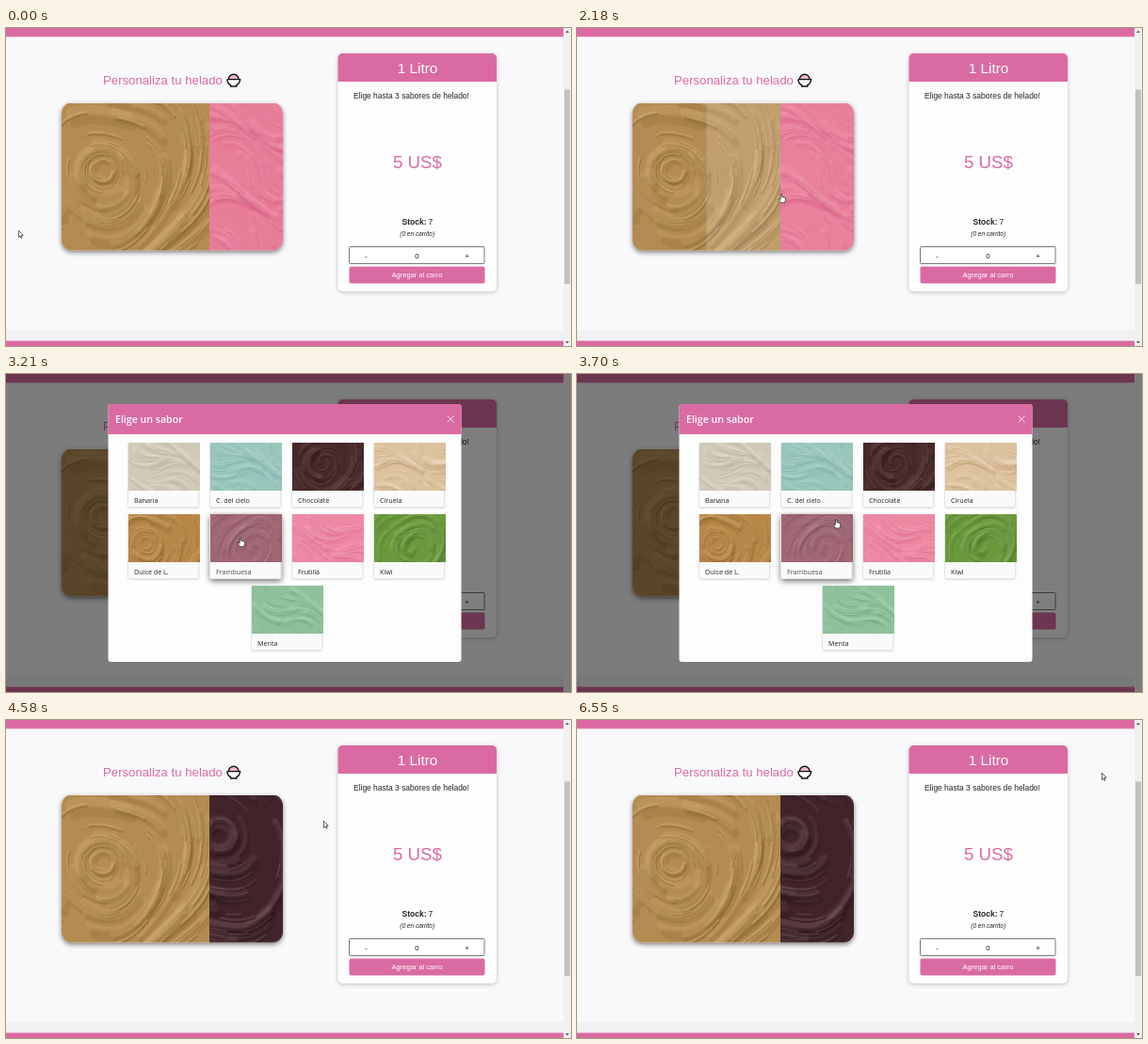
Recreate the animation shown at these times as an HTML page with a canvas. Size 600 by 338 pixels, loop 6.58 s.

```html
<!DOCTYPE html>
<html lang="es">
<head>
<meta charset="utf-8">
<title>Personaliza tu helado</title>
<style>
html, body { margin: 0; width: 100%; height: 100%; overflow: hidden; background: #f9f9fb; }
canvas { display: block; }
</style>
</head>
<body>
<canvas id="stage" width="600" height="338"></canvas>
<script>
const LOOP = 6580, OPEN = 2820, CLOSE = 4340;
const PINK = '#da6ba2';
const SANS = '"Liberation Sans", Arial, sans-serif';
const UI = '"Open Sans", "Noto Sans", sans-serif';
const stage = document.getElementById('stage').getContext('2d');

const clamp = v => Math.max(0, Math.min(1, v));
const ramp = (t, a, b) => clamp((t - a) / (b - a));
const smooth = u => u * u * (3 - 2 * u);

function layer(w, h) {
  const c = document.createElement('canvas');
  c.width = w;
  c.height = h;
  return c.getContext('2d');
}

function random(seed) {
  return () => {
    seed = (seed * 1664525 + 1013904223) % 4294967296;
    return seed / 4294967296;
  };
}

function box(g, x, y, w, h, r, fill, stroke) {
  g.beginPath();
  g.roundRect(x, y, w, h, r);
  if (fill) { g.fillStyle = fill; g.fill(); }
  if (stroke) { g.strokeStyle = stroke; g.lineWidth = 1; g.stroke(); }
}

function text(g, s, x, y, font, color, align = 'left') {
  g.font = font;
  g.fillStyle = color;
  g.textAlign = align;
  g.fillText(s, x, y);
}

function shadow(g, color, blur, dy) {
  g.shadowColor = color;
  g.shadowBlur = blur;
  g.shadowOffsetY = dy;
}

// Spread cream: ridges that follow a swirl or a slanted, wavy direction.
function cream(w, h, [base, light, dark], seed, flow, scale = 1) {
  const g = layer(w, h), rnd = random(seed);
  g.fillStyle = base;
  g.fillRect(0, 0, w, h);
  g.lineCap = g.lineJoin = 'round';
  const angle = (x, y) => flow.length
    ? Math.atan2(y - flow[1] * h, x - flow[0] * w) + 1.57 + 0.25 * Math.sin(x / 9 / scale)
    : flow + 0.55 * Math.sin(x / 13 / scale + seed) + 0.4 * Math.cos(y / 9 / scale);
  const ridge = (steps, width, alpha) => {
    let x = rnd() * w * 1.2 - w * 0.1, y = rnd() * h * 1.2 - h * 0.1;
    const pts = [];
    for (let i = 0; i < steps; i++) {
      pts.push([x, y]);
      const a = angle(x, y);
      x += Math.cos(a) * 2.2 * scale;
      y += Math.sin(a) * 2.2 * scale;
    }
    [[dark, width * 0.55], [light, -width * 0.35]].forEach(([color, d]) => {
      g.strokeStyle = color;
      g.globalAlpha = alpha;
      g.lineWidth = width;
      g.beginPath();
      pts.forEach(p => g.lineTo(p[0] + d * 0.5, p[1] + d));
      g.stroke();
    });
  };
  const n = Math.round(w * h / 90 / scale / scale);
  for (let i = 0; i < n * 0.6; i++) ridge(12 + rnd() * 10, (2.5 + rnd() * 3) * scale, 0.2);
  for (let i = 0; i < n; i++) ridge(4 + rnd() * 9, (0.4 + rnd() * 0.8) * scale, 0.45);
  return g.canvas;
}

const CARAMEL = cream(157, 157, ['#b48c52', '#d5b37b', '#7f5928'], 11, [0.28, 0.45], 2);
const ROSE = cream(79, 157, ['#e87d9a', '#f5a6b9', '#cd5074'], 5, 0.45, 1.3);
const COCOA = cream(79, 157, ['#412429', '#83636c', '#1f0d12'], 8, [0.15, 0.3], 1.7);

const FLAVORS = [
  ['Banana', ['#cfcab8', '#efece0', '#a59f86'], 0.5],
  ['C. del cielo', ['#98c5bc', '#c2dfd9', '#6da59b'], 0.55],
  ['Chocolate', ['#48292a', '#80605f', '#231110'], [0.45, 0.4]],
  ['Ciruela', ['#dcc29d', '#f4e7d2', '#b59262'], 0.4],
  ['Dulce de L.', ['#b78747', '#dab57b', '#7b5120'], [0.25, 0.6]],
  ['Frambuesa', ['#8a4151', '#b37281', '#562232'], [0.6, 0.75]],
  ['Frutilla', ['#ee88a3', '#fab5c6', '#d35a7f'], 0.45],
  ['Kiwi', ['#6a993d', '#9dc26b', '#3d6522'], [0.55, 0.7]],
  ['Menta', ['#8dc19b', '#bbdec2', '#629e75'], 0.7]
].map(([name, tones, flow], i) => ({
  name,
  pic: cream(76, 51, tones, 21 + i * 7, flow),
  x: i === 8 ? 260 : 129 + (i % 4) * 87,
  y: 73 + Math.floor(i / 4) * 76
}));

const PARTS = [59, 137.5, 215.5];

// start, end, from x/y, to x/y, vertical bow
const MOVES = [
  [760, 2610, 13, 215, 249, 174, -7],
  [3480, 4100, 249, 174, 339, 107, 0],
  [4800, 6150, 337, 107, 557, 56, 0]
];

function pointer(t) {
  let m = MOVES[0];
  for (const next of MOVES) if (t >= next[0] - 460) m = next;
  const s = smooth(ramp(t, m[0], m[1]));
  return [m[2] + (m[4] - m[2]) * s, m[3] + (m[5] - m[3]) * s + m[6] * 4 * s * (1 - s)];
}

const isOpen = t => t >= OPEN && t < CLOSE;

function hit(t, modal, x, y, w, h) {
  const [px, py] = pointer(t);
  return isOpen(t) === modal && px >= x && px < x + w && py >= y && py < y + h;
}

// Hover strength, averaged over the last moments so that it fades.
function hover(t, ...area) {
  let sum = 0;
  for (let k = 0; k < 8; k++) sum += hit(t - k * 20, ...area);
  return sum / 8;
}

function bowl(g) {
  g.strokeStyle = '#111';
  g.lineWidth = 1.4;
  g.fillStyle = '#f2b5cb';
  g.beginPath();
  g.arc(241.7, 54.5, 5.3, Math.PI, 0);
  g.fill();
  g.stroke();
  g.fillStyle = '#fff';
  g.beginPath();
  g.moveTo(234.8, 54.6);
  g.lineTo(248.6, 54.6);
  g.quadraticCurveTo(248, 59.5, 244.8, 60.5);
  g.lineTo(244.8, 62);
  g.lineTo(238.6, 62);
  g.lineTo(238.6, 60.5);
  g.quadraticCurveTo(235.4, 59.5, 234.8, 54.6);
  g.fill();
  g.stroke();
}

function picture(g, t) {
  g.save();
  shadow(g, 'rgba(0,0,0,.5)', 5, 2);
  box(g, 59, 79.5, 235, 157, 11, '#fff');
  g.restore();
  g.save();
  g.beginPath();
  g.roundRect(59, 79.5, 235, 157, 11);
  g.clip();
  g.drawImage(CARAMEL, 59, 79.5);
  g.drawImage(t < CLOSE ? ROSE : COCOA, 215.5, 79.5);
  PARTS.forEach(x => {
    g.fillStyle = `rgba(255,255,255,${0.18 * hover(t, false, x, 79.5, 78.4, 157)})`;
    g.fillRect(x, 79.5, 78.4, 157);
  });
  g.restore();
}

function card(g) {
  g.save();
  shadow(g, 'rgba(0,0,0,.25)', 4, 1);
  box(g, 352.5, 27, 168.5, 253, 5, '#fefefe');
  g.restore();
  box(g, 352.5, 27, 168.5, 30, [5, 5, 0, 0], PINK);
  text(g, '1 Litro', 437, 48, `15.3px ${SANS}`, '#fff', 'center');
  text(g, 'Elige hasta 3 sabores de helado!', 369, 75, `8.45px ${SANS}`, '#222');
  text(g, '5 US$', 437, 148.5, `18.7px ${SANS}`, PINK, 'center');
  text(g, 'Stock:', 420.5, 209, `bold 8.5px ${SANS}`, '#222');
  text(g, '7', 448.5, 209, `8.5px ${SANS}`, '#222');
  text(g, '(0 en carrito)', 436.7, 221, `italic 6.5px ${SANS}`, '#222', 'center');
  box(g, 364.5, 232.5, 143.5, 18, 1, '#fff', '#777');
  [['-', 382.5], ['0', 436.3], ['+', 489.7]].forEach(([s, x]) =>
    text(g, s, x, 244.5, `7.5px ${SANS}`, '#111', 'center'));
  box(g, 364.5, 253.5, 144, 18, 2, PINK);
  text(g, 'Agregar al carro', 436.5, 265, `7.5px ${SANS}`, '#fff', 'center');
}

function triangle(g, y, dir) {
  g.beginPath();
  g.moveTo(594, y);
  g.lineTo(598, y);
  g.lineTo(596, y + dir * 2.2);
  g.fill();
}

function page(g, t, scrollbar) {
  g.fillStyle = '#f9f9fb';
  g.fillRect(0, 0, 600, 338);
  g.fillStyle = '#f1f1f3';
  g.fillRect(0, 321, 592, 12);
  g.fillStyle = PINK;
  g.fillRect(0, 0, 592, 9.3);
  g.fillRect(0, 332.5, 592, 6);
  if (scrollbar) {
    g.fillStyle = '#f1f1f1';
    g.fillRect(592, 0, 8, 338);
    g.fillStyle = '#c1c1c1';
    g.fillRect(593, 65.5, 6, 206.5);
    g.fillStyle = '#555';
    triangle(g, 5, -1);
    triangle(g, 333, 1);
  }
  text(g, 'Personaliza tu helado', 103, 60, `13.2px ${SANS}`, PINK);
  bowl(g);
  picture(g, t);
  card(g);
}

const sheet = layer(600, 338);

function modal(t) {
  const g = sheet;
  g.clearRect(0, 0, 600, 338);
  box(g, 108.5, 32, 375, 274, 3, '#fdfdfd');
  box(g, 108.5, 32, 375, 32, [3, 3, 0, 0], PINK);
  text(g, 'Elige un sabor', 116, 52, `600 10.6px ${UI}`, '#fff');
  g.strokeStyle = 'rgba(255,255,255,.8)';
  g.lineWidth = 1;
  g.beginPath();
  g.moveTo(468.7, 44.5);
  g.lineTo(475.7, 51.5);
  g.moveTo(475.7, 44.5);
  g.lineTo(468.7, 51.5);
  g.stroke();
  FLAVORS.forEach(({ name, pic, x, y }) => {
    const on = hover(t, true, x, y, 76, 69);
    g.save();
    shadow(g, `rgba(0,0,0,${0.12 + 0.45 * on})`, 2 + 4 * on, 1 + on);
    box(g, x + 0.5, y, 76, 69, 2, '#fafafa');
    g.restore();
    box(g, x + 0.5, y + 0.5, 75, 68, 2, '#fafafa', '#e4e4e4');
    g.globalAlpha = 1 - 0.2 * on;
    g.drawImage(pic, x + 0.5, y);
    text(g, name, x + 7, y + 63.5, `7.2px ${UI}`, '#212529');
    g.globalAlpha = 1;
  });
  return g.canvas;
}

function shape(g, points) {
  g.beginPath();
  points.forEach(p => g.lineTo(p[0], p[1]));
  g.closePath();
  g.fillStyle = '#fff';
  g.strokeStyle = '#333';
  g.lineWidth = 0.8;
  g.lineJoin = 'round';
  g.fill();
  g.stroke();
}

const ARROW = [[0.4, 0.4], [0.4, 7.6], [2, 6.1], [3.1, 8.4], [4.1, 7.9], [3, 5.6], [5.2, 5.3]];
const HAND = [[-0.7, 0.2], [0.7, 0.2], [0.8, 3.2], [3.6, 3.9], [4.7, 4.6], [4.5, 7], [3.6, 9.4],
  [-0.2, 9.4], [-2.8, 6.2], [-2.6, 5.2], [-0.8, 6]];

function cursor(g, t) {
  const [x, y] = pointer(t);
  const hand = hit(t, false, 59, 79.5, 235, 157) ||
    FLAVORS.some(f => hit(t, true, f.x, f.y, 76, 69));
  g.save();
  g.translate(x, y);
  shape(g, hand ? HAND : ARROW);
  g.restore();
}

function draw(t) {
  const closing = t >= CLOSE;
  const shade = closing ? 1 - ramp(t, 4440, 4570) : ramp(t, OPEN, 2935);
  const fade = closing ? 1 - ramp(t, CLOSE, 4480) : ramp(t, OPEN, 2930);
  page(stage, t, shade === 0);
  if (shade > 0) {
    stage.fillStyle = `rgba(0,0,0,${0.5 * shade})`;
    stage.fillRect(0, 0, 600, 338);
  }
  if (fade > 0) {
    const p = closing ? 1 - smooth(ramp(t, CLOSE, 4640)) : ramp(t, OPEN, 3120);
    stage.globalAlpha = fade;
    stage.drawImage(modal(t), 0, -16 * Math.pow(1 - p, 1.3));
    stage.globalAlpha = 1;
  }
  cursor(stage, t);
}

const start = performance.now();
function tick() {
  draw((performance.now() - start) % LOOP);
  requestAnimationFrame(tick);
}
tick();
</script>
</body>
</html>
```
